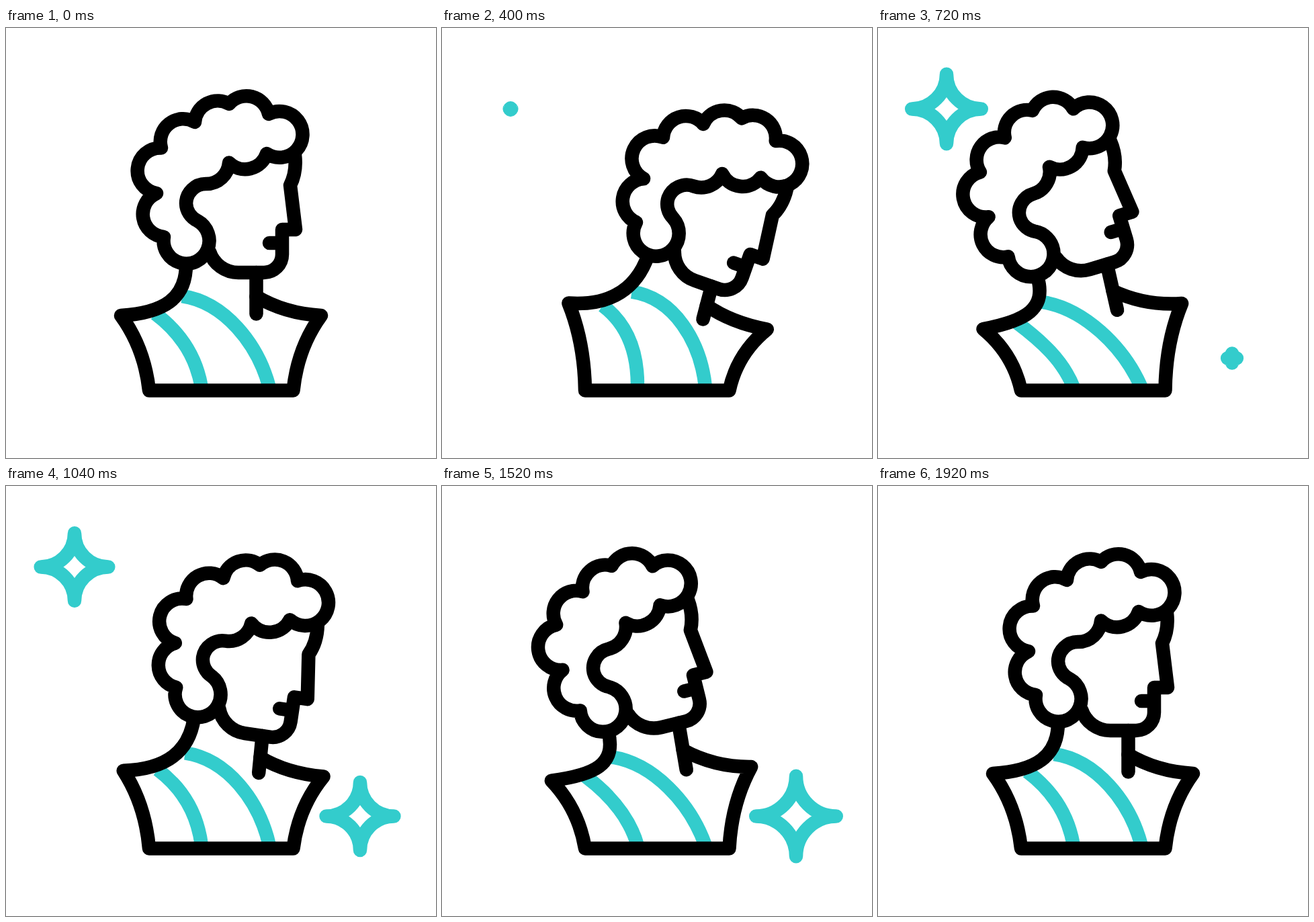
An HTML page that plays this animation: 640x640 px, repeating every 2200 ms.

```html
<!DOCTYPE html>
<html lang="en">
<head>
<meta charset="utf-8">
<title>Bust</title>
<style>
  html, body { margin: 0; width: 100%; height: 100%; overflow: hidden; background: #fff; }
  svg { display: block; width: 100vw; height: 100vh; }
  path { fill: none; stroke: #000; stroke-width: 20.5; stroke-linecap: round; stroke-linejoin: round; }
  .teal { stroke: #33cccc; }
  .stripe { stroke-linecap: butt; }
</style>
</head>
<body>
<svg viewBox="0 0 640 640">
  <path id="stripeA" class="teal stripe"/>
  <path id="stripeB" class="teal stripe"/>
  <path id="torso"/>
  <path id="bar"/>
  <g id="head">
    <path d="M391 128 A34.4 34.4 0 1 1 388 187 A34 34 0 0 1 332 200.5
      A34 34 0 0 1 298 232 A29.5 29.5 0 0 0 268 261 A29.5 29.5 0 0 0 285 287
      A34 34 0 1 1 235 311 A34 34 0 0 1 224 246 A34 34 0 0 1 231 178.5
      A34 34 0 0 1 281 140 A34 34 0 0 1 332 113 A34 34 0 0 1 391 128 Z"/>
    <path d="M430 189 Q433 214 423 234 L431 300 H411 V337 A27 27 0 0 1 384 364
      H346 A45 45 0 0 1 303 333 M392 320 H410"/>
  </g>
  <path id="starA" class="teal"/>
  <path id="starB" class="teal"/>
</svg>
<script>
const LOOP = 2200, STEP = 40, END = 1920;

// The bust sways in equal swings: the torso leans from the hips, the head nods from the neck.
const LEAN = [0, 7.6, -8, 4.2, -4, 0];
const NOD = [0, 11.9, -10.3, 11, -10, 0];
const SWING = END / (LEAN.length - 1);
const HIPS = [320, 551], NECK = [320, 400];
const BASE = 539.5, SHOULDER = 428;

const STAR_LIFE = 1112, POP = 192, SETTLE = 176, ARM = 50.3, ARM_MAX = 67.5;

const $ = id => document.getElementById(id);
const setPath = (id, d) => $(id).setAttribute('d', d);
const ease = t => t * t * (3 - 2 * t);
const lerp = (a, b, u) => a + (b - a) * u;
const mix = (p, q, u) => [lerp(p[0], q[0], u), lerp(p[1], q[1], u)];

function spin([x, y], deg, [cx, cy]) {
  const a = deg * Math.PI / 180, c = Math.cos(a), s = Math.sin(a);
  return [cx + c * (x - cx) - s * (y - cy), cy + s * (x - cx) + c * (y - cy)];
}

function swingAt(angles, t) {
  const i = Math.min(Math.floor(t / SWING), angles.length - 2);
  return lerp(angles[i], angles[i + 1], ease(t / SWING - i));
}

// Grows past its size and settles; leaves the same way in reverse.
function armAt(age) {
  const t = Math.min(age, STAR_LIFE - age);
  if (t <= 0) return 0;
  if (t < POP) return ARM_MAX * ease(t / POP);
  return lerp(ARM_MAX, ARM, ease(Math.min(1, (t - POP) / SETTLE)));
}

function drawStar(id, x, y, age) {
  const r = armAt(age), arc = `a${r} ${r} 0 0 0 `;
  setPath(id, r
    ? `M${x} ${y - r}${arc}${r} ${r}${arc}${-r} ${r}${arc}${-r} ${-r}${arc}${r} ${-r}Z`
    : '');
}

// The pull of the leaning start fades out towards the fixed hem.
function drawStripe(id, points, bend) {
  const [x, y] = points[0], [bx, by] = bend(x, y);
  const [a, b, c, d] = points.map(([px, py], i) => {
    const pull = [1, 1, .5, 0][i];
    return [px + (bx - x) * pull, py + (by - y) * pull];
  });
  setPath(id, `M${a}C${b} ${c} ${d}`);
}

function draw(t) {
  const lean = swingAt(LEAN, t), nod = swingAt(NOD, t);
  const bend = (x, y) =>
    spin([x, y], lean * Math.min(1, (BASE - y) / (BASE - SHOULDER)), HIPS);
  const onHead = (x, y) => spin(spin([x, y], nod, NECK), lean, HIPS);

  $('head').setAttribute('transform', `rotate(${lean} ${HIPS}) rotate(${nod} ${NECK})`);

  const jaw = onHead(372.5, 364), barEnd = bend(372.5, 425.5);
  setPath('bar', `M${jaw}L${barEnd}`);
  setPath('torso', `M${onHead(268, 352)}
    C${onHead(268, 402)} ${bend(236, 424)} ${bend(171, SHOULDER)}
    Q${bend(206, 476)} 213 ${BASE} H427.5
    Q${bend(434, 476)} ${bend(469, SHOULDER)}
    Q${bend(415, 425)} ${mix(jaw, barEnd, .58)}`);

  drawStripe('stripeA', [[262, 399], [325, 408], [375, 470], [392, 535]], bend);
  drawStripe('stripeB', [[222, 425], [258, 452], [283, 488], [291, 535]], bend);
  drawStar('starA', 102, 120.5, t - 384);
  drawStar('starB', 527, 491.5, t - 682);
}

const start = performance.now();
function tick() {
  const t = (performance.now() - start) % LOOP;
  draw(Math.min(Math.floor(t / STEP) * STEP, END));
  requestAnimationFrame(tick);
}
tick();
</script>
</body>
</html>
```
